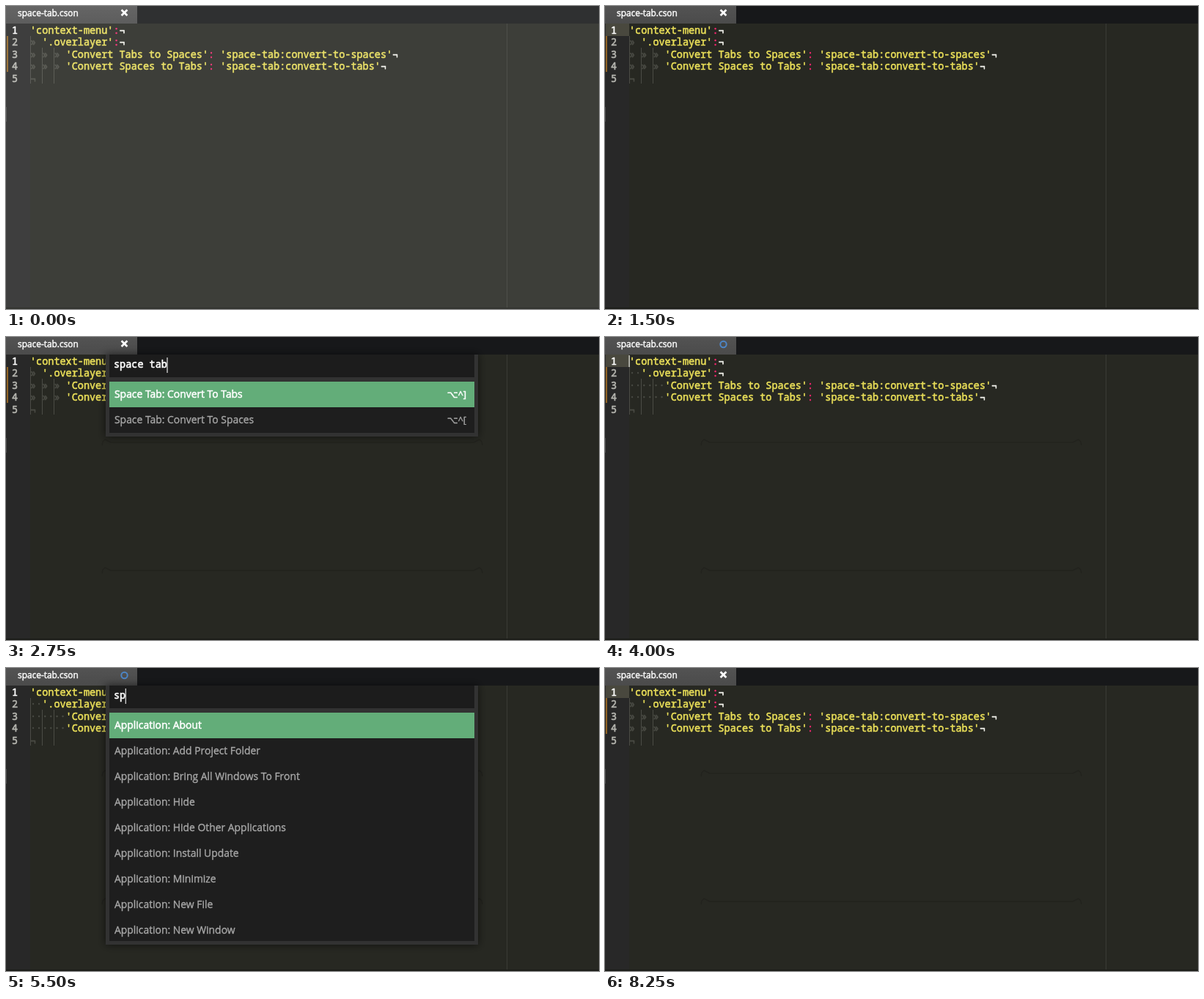
Recreate the animation shown at these times as an HTML page with a canvas. Size 809x414 px, loop 8500 ms.

```html
<!DOCTYPE html>
<html lang="en">
<head>
<meta charset="utf-8">
<title>Convert tabs and spaces</title>
<style>
  html, body { margin: 0; width: 100%; height: 100%; overflow: hidden; background: #272822; }
  canvas { display: block; }
</style>
</head>
<body>
<canvas id="stage" width="809" height="414"></canvas>
<script>
const ctx = document.getElementById('stage').getContext('2d');
const LOOP = 8500;
const MONO = '13.5px "Noto Sans Mono", "DejaVu Sans Mono", monospace';
const UI = '"Open Sans", "Noto Sans", "DejaVu Sans", sans-serif';
const CHAR = 8.1, LEFT = 33, ROW = 16.4;
const YELLOW = '#e8dd58', DIM = '#4b4c45';

const CODE = [
  [0, "'context-menu'"],
  [1, "'.overlayer'"],
  [3, "'Convert Tabs to Spaces'", "'space-tab:convert-to-spaces'"],
  [3, "'Convert Spaces to Tabs'", "'space-tab:convert-to-tabs'"],
];

const MATCHES = [
  ['Space Tab: Convert To Tabs', '⌥^]'],
  ['Space Tab: Convert To Spaces', '⌥^['],
];
const SPACE_MATCHES = [
  ...MATCHES,
  ['Whitespace: Convert Spaces To Tabs'],
  ['Whitespace: Convert Tabs To Spaces'],
  ['Whitespace: Remove Trailing Whitespace'],
  ['Whitespace: Save With Trailing Whitespace'],
  ['Whitespace: Save Without Trailing Whitespace'],
];
const ALL_COMMANDS = [
  'About', 'Add Project Folder', 'Bring All Windows To Front', 'Hide',
  'Hide Other Applications', 'Install Update', 'Minimize', 'New File', 'New Window',
].map(name => ['Application: ' + name]);

// Each step overrides part of the state from its time on.
const START = { flash: true, focus: false, cursor: false, tabs: true, modified: false, marks: true, query: null, pick: 0 };
const STEPS = [
  [250, { flash: false }],
  [1250, { focus: true, cursor: true }],
  [1500, { cursor: false }],
  [2000, { focus: false, cursor: true, query: '' }],
  [2250, { query: 'sp' }],
  [2500, { query: 'space' }],
  [2750, { query: 'space tab' }],
  [3000, { pick: 1 }],
  [3250, { cursor: false }],
  [3750, { query: null, pick: 0, focus: true, cursor: true, tabs: false }],
  [4000, { modified: true }],
  [4250, { cursor: false }],
  [4500, { marks: false }],
  [4750, { cursor: true }],
  [5250, { focus: false, query: '' }],
  [5500, { query: 'sp' }],
  [5750, { query: 'space' }],
  [6000, { query: 'space ta' }],
  [6250, { query: 'space tab' }],
  [6750, { query: null, focus: true, tabs: true }],
  [7000, { modified: false }],
  [7250, { cursor: false }],
  [7500, { marks: true }],
  [7750, { cursor: true }],
  [8250, { cursor: false }],
];

function stateAt(time) {
  return Object.assign({}, START, ...STEPS.filter(([at]) => at <= time).map(([, change]) => change));
}

function rect(color, x, y, w, h) {
  ctx.fillStyle = color;
  ctx.fillRect(x, y, w, h);
}

// A thin outline of the given weight thickens the letters without widening them.
function text(str, x, y, color, { font = MONO, weight = 0.6, align = 'left' } = {}) {
  ctx.font = font;
  ctx.textAlign = align;
  ctx.fillStyle = ctx.strokeStyle = color;
  ctx.fillText(str, x, y);
  if (weight) {
    ctx.lineWidth = weight;
    ctx.lineJoin = 'round';
    ctx.strokeText(str, x, y);
  }
}

function stroke(color, width, points) {
  ctx.strokeStyle = color;
  ctx.lineWidth = width;
  ctx.beginPath();
  points.forEach(([x, y]) => ctx.lineTo(x, y));
  ctx.stroke();
}

function drawTabBar(modified) {
  rect('#17181a', 0, 0, 809, 24);
  const shade = ctx.createLinearGradient(0, 0, 0, 24);
  shade.addColorStop(0, '#535353');
  shade.addColorStop(1, '#4b4b4b');
  rect(shade, 0, 0, 179, 24);
  text('space-tab.cson', 16, 14, '#fafafa', { font: '11.9px ' + UI, weight: 0.5 });
  if (modified) {
    ctx.strokeStyle = '#4d86c6';
    ctx.lineWidth = 2;
    ctx.beginPath();
    ctx.arc(161.5, 10, 4.2, 0, 7);
    ctx.stroke();
  } else {
    stroke('#fff', 2.7, [[157.6, 5.2], [165.4, 13]]);
    stroke('#fff', 2.7, [[165.4, 5.2], [157.6, 13]]);
  }
}

function drawEditor({ focus, cursor, tabs, marks }) {
  rect('#272822', 0, 24, 809, 390);
  rect('#282828', 0, 24, LEFT, 390);
  rect('#1c1d19', 0, 412, 809, 2);
  rect('#484848', 0, 138, 1, 20);
  if (focus) rect('#49483e', 1, 24, 32, 17);
  if (marks) rect('#936524', 1, 41, 2, 49);

  rect(DIM, 33, 41, 1, 65);
  rect(DIM, 49, 57, 1, 49);
  rect(DIM, 65, 57, 1, 49);
  rect('#3a3b35', 683, 24, 1, 388);

  for (let row = 0; row < 5; row++) {
    const y = 38 + row * ROW;
    text(row + 1, 8, y, row ? '#b4b4ae' : '#fff');
    if (row === 4) {
      text('¬', LEFT, y + 1, DIM);
      continue;
    }
    const [indent, key, value] = CODE[row];
    for (let i = 0; i < indent; i++) {
      text(tabs ? '»' : '··', LEFT + i * 2 * CHAR, y, DIM);
    }
    let x = LEFT + indent * 2 * CHAR;
    const put = (str, color, drop = 0) => {
      text(str, x, y + drop, color);
      x += str.length * CHAR;
    };
    put(key, YELLOW);
    put(':', '#f92672');
    if (value) put(' ' + value, YELLOW);
    put('¬', '#f8f8f2', 1);
  }
  if (focus && cursor) rect('#f0f0e8', 32.5, 25, 1.2, 16);
}

// Faint traces left where the palette's shadow ended.
function drawShadowTrace(y) {
  stroke('rgba(0,0,0,.14)', 1.5, [
    [131, y + 8], [132, y + 3], [135, y], [143, y + 4],
    [638, y + 4], [646, y], [649, y + 3], [650, y + 8],
  ]);
}

function drawPalette({ query, pick, cursor }) {
  const items = query.length < 5 ? ALL_COMMANDS : query === 'space' ? SPACE_MATCHES : MATCHES;
  const height = Math.min(items.length * 35, 312);
  ctx.save();
  ctx.shadowColor = 'rgba(0,0,0,.6)';
  ctx.shadowBlur = 11;
  rect('#323232', 136, 24, 508, height + 42);
  ctx.restore();

  rect('#1c1c1c', 141, 24, 498, 31);
  text(query, 147, 42, '#fff');
  if (cursor) rect('#e4e4e4', 146.5 + query.length * CHAR, 28, 1.2, 21);

  ctx.save();
  ctx.beginPath();
  ctx.rect(141, 61, 498, height);
  ctx.clip();
  items.forEach(([label, keys = ''], i) => {
    const y = 61 + i * 35, chosen = i === pick;
    const color = chosen ? '#fff' : '#a8a8a8';
    const weight = chosen ? 0.55 : 0.35;
    rect(chosen ? '#63ad79' : '#1e1e1e', 141, y, 498, 35);
    text(label, 148, y + 22, color, { font: '13.9px ' + UI, weight });
    text(keys, 628, y + 22, color, { font: '13px ' + UI, weight, align: 'right' });
  });
  ctx.restore();
}

function draw() {
  const time = performance.now() % LOOP;
  const state = stateAt(time);
  drawEditor(state);
  drawTabBar(state.modified);
  if (time >= 2750) [140, 315].forEach(drawShadowTrace);
  if (state.query !== null) drawPalette(state);
  if (state.flash) rect('rgba(255,255,255,.1)', 0, 0, 809, 414);
  requestAnimationFrame(draw);
}
draw();
</script>
</body>
</html>
```
